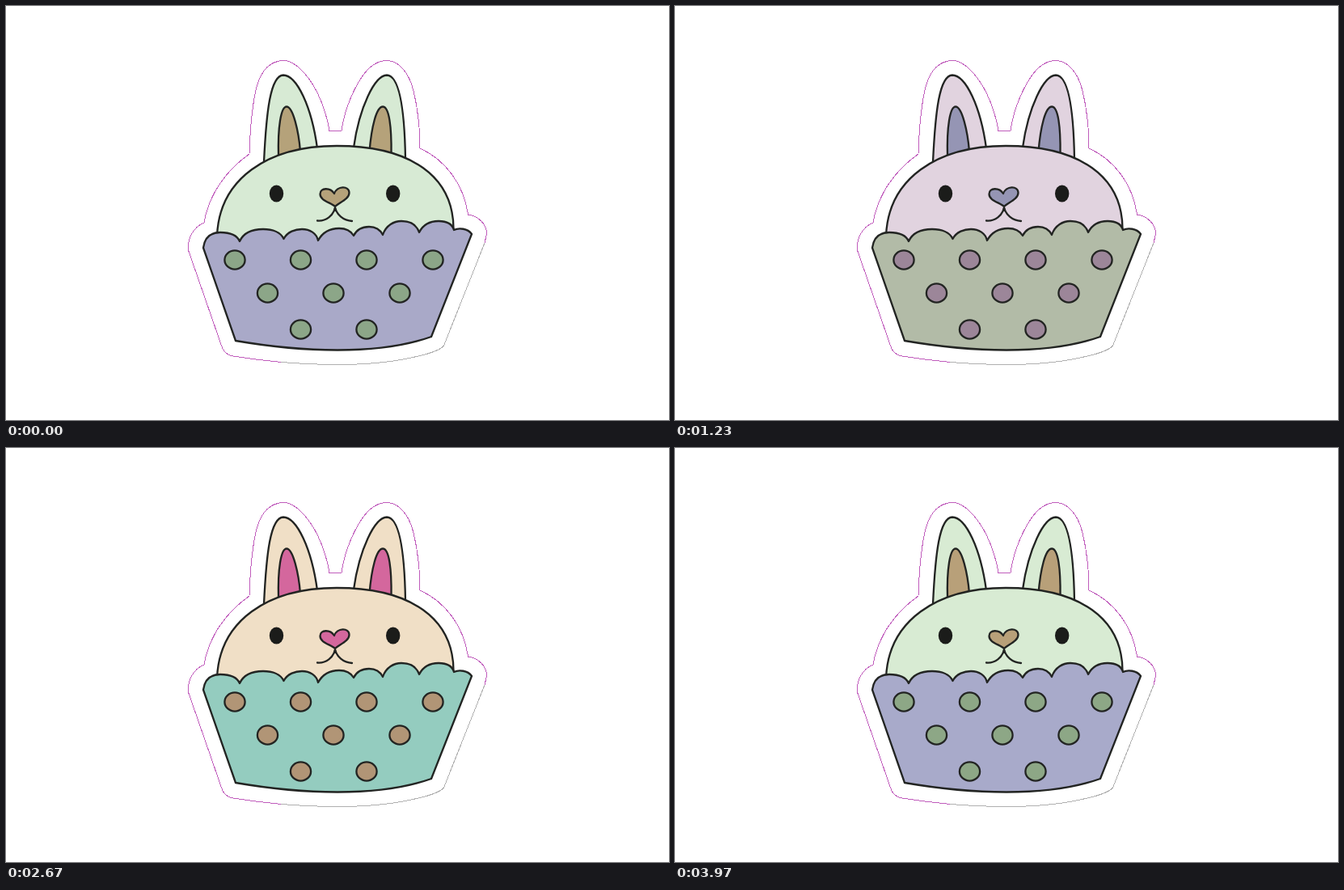
Write an HTML page without scripts that moves like this. It is 820 px wide and 512 px high and loops after 4010 ms.

```html
<!DOCTYPE html>
<html lang="en">
<head>
<meta charset="utf-8">
<title>Bunny cupcake</title>
<style>
@property --turn {
  syntax: "<angle>";
  inherits: true;
  initial-value: 0deg;
}
html, body {
  margin: 0;
  width: 100%;
  height: 100%;
  overflow: hidden;
  background: #fff;
}
svg {
  display: block;
  width: 820px;
  height: 512px;
  animation: tint 4010ms steps(120) infinite;
}
@keyframes tint {
  from { --turn: 0deg; }
  to { --turn: 360deg; }
}
/* each channel swings around its mean: mean + swing * cos(turn - peak) */
.skin {
  fill: rgb(calc(227.5 + 14 * cos(var(--turn) - 210deg)),
            calc(222.5 + 14.5 * cos(var(--turn) - 325deg)),
            calc(210.5 + 14 * cos(var(--turn) - 82deg)));
}
.blush {
  fill: rgb(calc(182 + 35 * cos(var(--turn) - 268deg)),
            calc(136 + 34 * cos(var(--turn) - 40deg)),
            calc(154 + 36 * cos(var(--turn) - 152deg)));
}
.cup {
  fill: rgb(calc(164 + 17 * cos(var(--turn) - 72deg)),
            calc(188 + 20 * cos(var(--turn) - 200deg)),
            calc(186 + 21 * cos(var(--turn) - 312deg)));
}
.dots {
  fill: rgb(calc(159 + 21 * cos(var(--turn) - 207deg)),
            calc(149.5 + 20 * cos(var(--turn) - 328deg)),
            calc(135 + 19 * cos(var(--turn) - 86deg)));
}
.ink {
  stroke: #222422;
  stroke-width: 2.3;
  stroke-linejoin: round;
  stroke-linecap: round;
}
.cut {
  fill: none;
  stroke: #c05cbc;
  stroke-width: 1;
  shape-rendering: crispEdges;
}
.shade { stroke: #b0b0b0; }
.line { fill: none; }
.eyes { fill: #1b1c1a; }
</style>
</head>
<body>
<svg viewBox="0 0 820 512">
  <defs>
    <ellipse id="dot" rx="12.600" ry="11.600"/>
  </defs>

  <path class="cut" d="M340 440.500Q308 437.500 278 432.500C271 430 268 425 266.500 420L225.500 302
    C224 288 232 273 245 268C251 231 275 201 301 183C302 150 305 120 310 100C317 75 331 67.500 344 67.500
    C357 67.500 373 84 385 107C394 126 398 141 400 154.500H415C417 138 425 110 440 88
    C450 73 460 67.500 471 67.500C484 67.500 498 80 504 105C510 130 512 155 512 176
    C543 190 566 220 571.500 258C585 260 594.500 270 594.500 282L592 293"/>
  <path class="cut shade" d="M592 293L541.500 420Q536 427 510 433C478 441 440 444 400 443.500Q370 443 340 440.500"/>

  <g class="ink">
    <g class="skin">
      <path d="M319 193C322 130 327 86 343 85.500C360 86 378 125 385 176"/>
      <path d="M430 175C437 125 456 86 471 85.500C487 86 493 130 494 189"/>
    </g>
    <g class="blush">
      <path d="M337 186C336 150 340 124.500 347 124.500C355 124.500 362 155 364 180"/>
      <path d="M449.500 180C452 150 458 124.500 466 124.500C474 124.500 477 150 476.500 183"/>
    </g>
    <path class="skin" d="M261 284C264 214 323 173 409 173C501 173 554 211 553.500 277V300H265Z"/>
    <path class="blush" d="M407 248C402 243 388.500 241 388.500 232.500C388.500 224.500 401 224 406 232
      C409 222.500 424.500 221.500 424.500 231C424.500 239 412 243 407 248Z"/>
    <path class="line" d="M385 265.500C396 266.500 405 259 407 249C409 258 417 265.500 428 266"/>
    <path class="cup" d="M244 299C246 284 255 280 265 280C278 280 286 284 289 291
      C294 280 306 276 318 276C330 276 340 280 343.500 288C348 279 358 276 366 276
      C376 276 384 281 386 290C392 279 402 275 412 275C421 275 427 279 430 284
      C434 276 442 273 449 273C458 273 463 277 466 283C470 271 480 266 489 266
      C500 266 508 271 511 280C516 270 525 266 535 266C545 266 552 270 554 277
      C560 274 571 275 576 282L526 409C495 420 455 425.500 410 425.500
      C365 425.500 325 421 284 414Z"/>
    <g class="dots">
      <use href="#dot" x="283" y="314"/>
      <use href="#dot" x="364.500" y="314"/>
      <use href="#dot" x="446" y="314"/>
      <use href="#dot" x="528" y="314"/>
      <use href="#dot" x="323.500" y="355"/>
      <use href="#dot" x="405" y="355"/>
      <use href="#dot" x="487" y="355"/>
      <use href="#dot" x="364.500" y="400"/>
      <use href="#dot" x="446" y="400"/>
    </g>
  </g>
  <g class="eyes">
    <ellipse cx="334.500" cy="232" rx="8.700" ry="10.500"/>
    <ellipse cx="478.700" cy="232" rx="8.700" ry="10.500"/>
  </g>
</svg>
</body>
</html>
```
